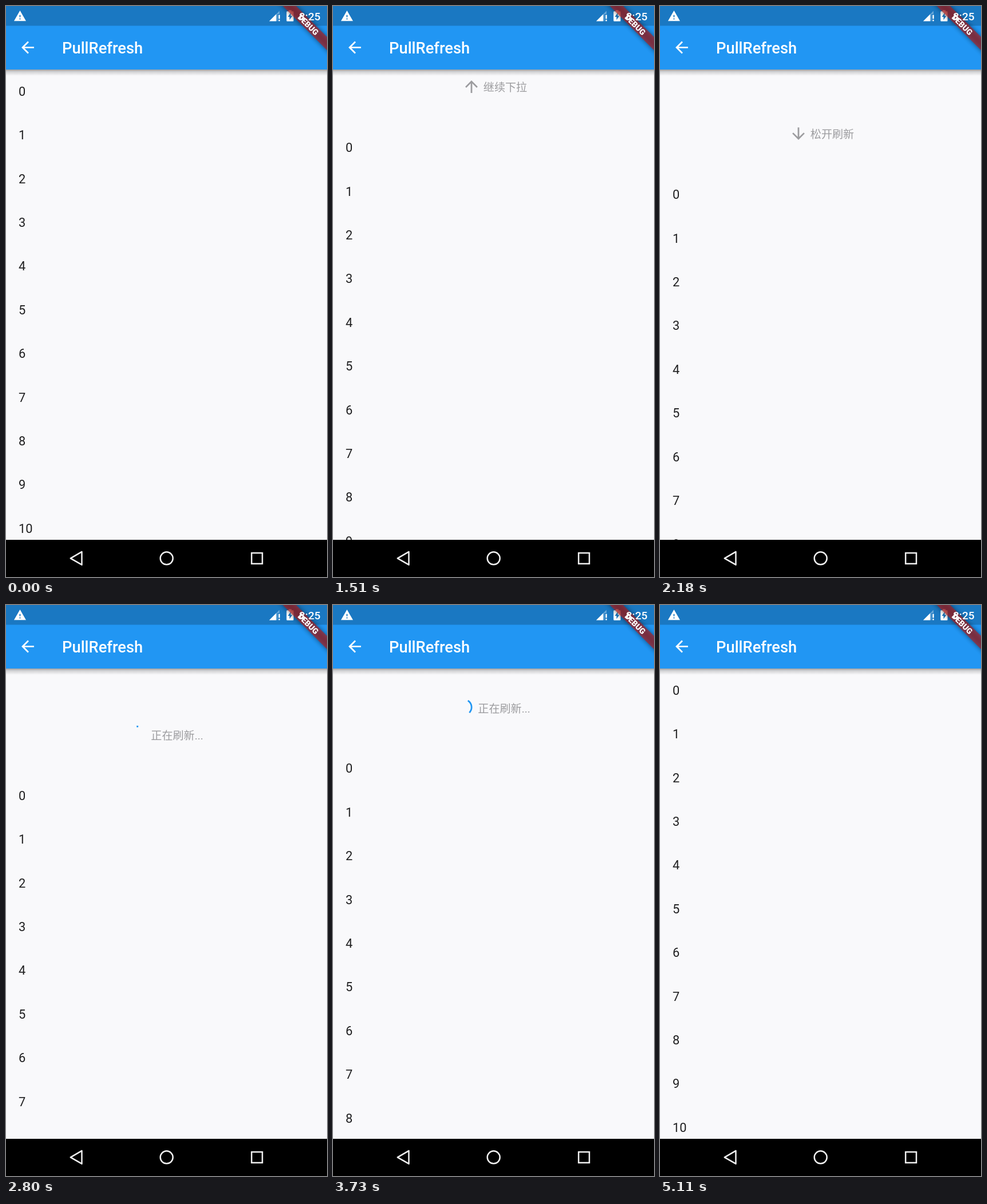
Write an HTML page that moves like this. It is 561 px wide and 998 px high and loops after 5810 ms.

```html
<!DOCTYPE html>
<html lang="zh-CN">
<head>
<meta charset="utf-8">
<title>Pull to refresh</title>
<style>
  html, body { margin: 0; width: 100%; height: 100%; overflow: hidden; background: #f9f9fb; }
  svg { display: block; width: 561px; height: 998px; font-family: Roboto, "Noto Sans CJK SC", "Noto Sans CJK", sans-serif; }
  .rows { font-size: 21.84px; fill: #1f1f20; }
  .head { font-size: 19.1px; fill: #9c9c9f; }
  .title { font-size: 27.3px; font-weight: 500; }
  .clock { font-size: 19.1px; font-weight: 500; }
  .debug { font-size: 13.9px; font-weight: 900; text-anchor: middle; }
  .nav { fill: none; stroke: #f0f0f0; stroke-width: 2.5; }
</style>
</head>
<body>
<svg viewBox="0 0 561 998">
  <defs>
    <linearGradient id="shade" x2="0" y2="1">
      <stop offset="0" stop-color="#000" stop-opacity=".36"/>
      <stop offset=".35" stop-color="#000" stop-opacity=".16"/>
      <stop offset="1" stop-color="#000" stop-opacity="0"/>
    </linearGradient>
    <filter id="blur" x="-20%" y="-60%" width="140%" height="220%">
      <feGaussianBlur stdDeviation="4"/>
    </filter>
  </defs>

  <rect width="561" height="998" fill="#f9f9fb"/>

  <g id="content">
    <g id="rows" class="rows"></g>
    <g id="pull" class="head">
      <g transform="translate(242 42.7)">
        <path id="arrow" d="M-8 0l1.41 1.41L-1-4.17V8h2V-4.17l5.58 5.59L8 0 0-8z"/>
      </g>
      <text id="hint" x="262.8" y="51"></text>
    </g>
    <g id="busy" class="head">
      <path id="arc" fill="none" stroke="#2196f3" stroke-width="2.73" stroke-linecap="square"/>
      <text x="253.3" y="51">正在刷新...</text>
    </g>
  </g>

  <!-- app bar and status bar -->
  <rect y="111" width="561" height="11" fill="url(#shade)"/>
  <rect width="561" height="111" fill="#2196f3"/>
  <rect width="561" height="34.5" fill="#1a78c2"/>
  <g fill="#fff">
    <path transform="translate(38 72.5) scale(1.365) translate(-12 -12)"
      d="M20 11H7.83l5.59-5.59L12 4l-8 8 8 8 1.41-1.41L7.83 13H20z"/>
    <text class="title" x="98" y="82.5">PullRefresh</text>
    <path transform="translate(13 6.2) scale(.955)" fill-rule="evenodd"
      d="M1 21h22L12 2zM13 18h-2v-2h2zM13 14h-2v-4h2z"/>
    <path d="M460 26.5L478 8.5V14H474.5V26.5z" opacity=".35"/>
    <path d="M460 26.5L472 14.5V26.5zM476.3 15.5h2.4v7h-2.4zM476.3 24.1h2.4v2.4h-2.4z"/>
    <path fill-rule="evenodd"
      d="M491.5 9.3H494V7.3H499V9.3H501.5Q502.6 9.3 502.6 10.4V25.6Q502.6 26.8 501.5 26.8H491.5Q490.3 26.8 490.3 25.6V10.4Q490.3 9.3 491.5 9.3zM497.6 11.8L492.6 19H495.5V24.6L500.4 17.2H497.6z"/>
  </g>

  <!-- corner ribbon -->
  <g transform="translate(561 0) rotate(45)">
    <rect x="-70" y="38.2" width="140" height="16.4" opacity=".5" filter="url(#blur)"/>
    <rect x="-70" y="38.2" width="140" height="16.4" fill="#b71c1c" fill-opacity=".627"/>
    <text class="debug" y="51.4" fill="#fff">DEBUG</text>
  </g>
  <text class="clock" x="512" y="24.6" fill="#fff">8:25</text>

  <!-- navigation bar -->
  <rect y="933" width="561" height="65"/>
  <g class="nav">
    <path d="M112.8 965.3L132.5 953.9V976.7z" stroke-linejoin="round"/>
    <circle cx="280.7" cy="965.3" r="11"/>
    <rect x="429.2" y="956" width="18.8" height="18.8"/>
  </g>
</svg>
<script>
  const LOOP = 5810, DRAG = 1269, RELEASE = 2790, SPIN = 2780, CLOSE = 4630, SETTLED = 5110;
  const HEADER = 136.7, ROW = 76.4, DP = 1.365;
  const $ = id => document.getElementById(id);
  const [content, pull, busy, arrow, hint, arc] =
    ['content', 'pull', 'busy', 'arrow', 'hint', 'arc'].map($);

  $('rows').innerHTML = Array.from({ length: 11 }, (_, i) =>
    `<text x="22" y="${156.8 + i * ROW}">${i}</text>`).join('');

  // Critically damped return, 1 to 0
  const spring = ms => {
    const x = 0.016 * ms;
    return (1 + x) * Math.exp(-x);
  };

  // Finger drag with growing resistance
  const drag = t => t < 1360
    ? 28 * ((t - DRAG) / 91) ** 2
    : 187 - 89 * Math.exp(-0.00388 * (t - 1510));

  function offsetAt(t) {
    if (t < DRAG || t >= SETTLED) return 0;
    if (t < RELEASE) return drag(Math.min(t, 2440));
    if (t < CLOSE) return HEADER + (drag(2440) - HEADER) * spring(t - RELEASE);
    return HEADER * spring(t - CLOSE);
  }

  // cubic-bezier(.4, 0, .2, 1)
  function ease(x) {
    if (x <= 0) return 0;
    if (x >= 1) return 1;
    let lo = 0, hi = 1, s;
    for (let i = 0; i < 20; i++) {
      s = (lo + hi) / 2;
      if (1.2 * s * (1 - s) ** 2 + 0.6 * s * s * (1 - s) + s ** 3 < x) lo = s; else hi = s;
    }
    return s * s * (3 - 2 * s);
  }

  function arcPath(ms) {
    const turns = ms / 1333.2, step = Math.floor(turns), f = turns - step;
    const head = ease(f * 2), tail = ease(f * 2 - 1);
    const start = Math.PI * (-0.5 + 1.5 * tail + 1.7 * f - 0.8 * step);
    const sweep = Math.max(1.5 * Math.PI * (head - tail), 0.004);
    const r = 10 * DP;
    const at = a => `${228.5 + r * Math.cos(a)} ${42 + r * Math.sin(a)}`;
    return `M${at(start)}A${r} ${r} 0 ${sweep > Math.PI ? 1 : 0} 1 ${at(start + sweep)}`;
  }

  function draw(t) {
    const offset = offsetAt(t), loading = t >= RELEASE, ready = offset >= HEADER;
    content.setAttribute('transform', `translate(0 ${offset.toFixed(2)})`);
    pull.style.display = loading ? 'none' : '';
    busy.style.display = loading ? '' : 'none';
    hint.textContent = ready ? '松开刷新' : '继续下拉';
    arrow.setAttribute('transform', `scale(${DP} ${ready ? -DP : DP})`);
    if (loading) arc.setAttribute('d', arcPath(t - SPIN));
  }

  function tick() {
    draw(performance.now() % LOOP);
    requestAnimationFrame(tick);
  }
  tick();
</script>
</body>
</html>
```
